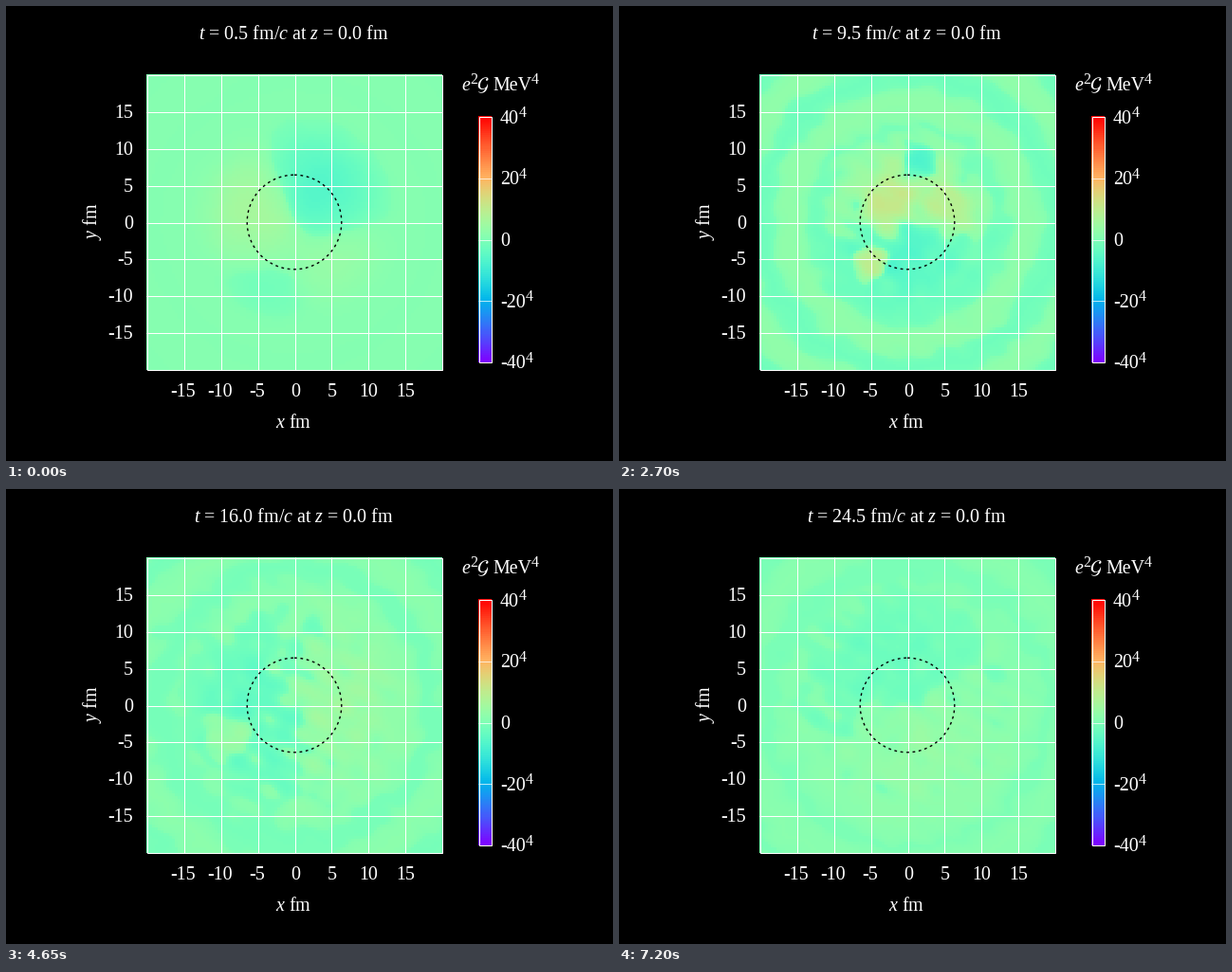
Recreate the animation shown at these times as a matplotlib script. Size 640 by 480 pixels, loop 7350 ms.

```python
import numpy as np
import matplotlib.pyplot as plt
from matplotlib.animation import FuncAnimation
from matplotlib.patches import Circle, Rectangle

plt.rcParams.update({
    "font.family": "Liberation Serif",
    "mathtext.fontset": "custom",
    "mathtext.rm": "Liberation Serif",
    "mathtext.it": "Liberation Serif:italic",
    "toolbar": "None",
})

DPI, FRAMES, STEP = 80, 49, 150
PX = 72 / DPI                     # points per pixel
CX, CY, SCALE = 304, 228, 7.775   # plot centre and pixels per fm
CELLS, LIMIT = 104, 40

# Key poses of the core dipole: direction of its negative side, radius, level.
TIMES = [.5, 4.5, 9.5, 12, 16, 18.5, 24.5]
TURN = [30, 95, 270, 235, 190, 150, 110]
REACH = [10, 16, 10, 11, 13, 13, 14]
LEVEL = [5.5, 6.5, 6.5, 5.5, 4.6, 4.4, 3.2]

# Short-lived hot spots: time, x, y, radius, level.
SPOTS = [
    (4.5, -3.5, 8.5, 4, 8.5), (4.5, 4.8, 2.5, 2, 13), (4.5, 2, 4, 3.5, -10),
    (4.5, -2, -3, 3.5, 10), (4.5, -1, -8.2, 1.2, -9),
    (9.5, -3, 2.5, 3.2, 9.5), (9.5, 5.5, 2, 2.8, 8), (9.5, 1.5, 8.3, 2.2, -8.5),
    (9.5, -5, -5.5, 2, 10),
    (12, 9, 1, 3, 6), (12, -2.5, -3, 2, 7),
    (17, -9, -4, 3, 6), (18.5, 2, 7, 4, -6.5),
]

axis = (np.arange(CELLS) + .5) * 40 / CELLS - 20
X, Y = np.meshgrid(axis, axis)

rng = np.random.default_rng(7)
WAVES = [(rng.uniform(.6, 2.6), rng.uniform(0, 2 * np.pi), rng.uniform(0, 2 * np.pi))
         for _ in range(30)]


def square(level):
    return level * abs(level)


def ripple(waves, t):
    """Smooth seeded noise that drifts slowly."""
    total = sum(np.sin(k * (.7 * X * np.cos(a) + Y * np.sin(a)) + p + .5 * t * np.cos(3 * p))
                for k, a, p in waves)
    return total / np.sqrt(len(waves))


def levels(t):
    """Colour levels: signed square roots, so that signs meet at sharp edges."""
    age = min(t / 12, 1)
    rough = .15 + .45 * age
    x, y = X + rough * ripple(WAVES[:8], t), Y + rough * ripple(WAVES[8:16], t)
    r, angle = np.hypot(x, y), np.arctan2(y, x)
    turn = np.radians(np.interp(t, TIMES, TURN))
    reach = np.interp(t, TIMES, REACH)
    power = square(np.interp(t, TIMES, LEVEL))

    # Core: a turning dipole, with a quadrupole that dies out early.
    core = np.exp(-(r / reach) ** 4)
    modes = -np.cos(angle - turn) * np.tanh(r / 2)
    modes -= np.exp((.5 - t) / 1.5) * r / 8 * np.cos(2 * (angle - np.radians(60)))
    field = 1 + power * core * (modes + .5 * age * ripple(WAVES[16:], t))

    # Rings that run outwards at the speed of light.
    swell = 5 * np.exp(-((t - 10) / 5) ** 2) + 1.5 * age
    field += swell * (1 - core) * np.cos(2 * np.pi * (r - t - 6.5) / 8)

    for birth, sx, sy, radius, level in SPOTS:
        life = np.exp(-((t - birth) / 1.8) ** 2)
        dist = np.hypot(x - sx, y - sy) / radius
        field += square(level) * life * np.exp(-dist ** 4)
    return np.sign(field) * np.sqrt(np.abs(field))


fig = plt.figure(figsize=(640 / DPI, 480 / DPI), dpi=DPI, facecolor="black")
ax = fig.add_axes([0, 0, 1, 1])
ax.axis("off")


def label(x, y, text, size=20, ha="left", **kw):
    return ax.text(x, y, text, color="white", fontsize=size * PX, ha=ha,
                   va=kw.pop("va", "baseline"), **kw)


def line(x, y, alpha=1):
    ax.plot(x, y, color="white", lw=PX, alpha=alpha, solid_capstyle="butt")


def frame(x, y, w, h):
    ax.add_patch(Rectangle((x, y), w, h, fill=False, ec="white", lw=PX, zorder=3))


def picture(data, extent, **kw):
    return ax.imshow(data, cmap="rainbow", vmin=-LIMIT, vmax=LIMIT, extent=extent,
                     interpolation="nearest", aspect="auto", **kw)


image = picture(np.zeros((CELLS, CELLS)), (148, 460, 384, 72), origin="lower")
picture(np.linspace(LIMIT, -LIMIT, 128)[:, None], (498, 512, 376, 116))

for v in range(-15, 16, 5):
    px, py = np.floor(CX + v * SCALE) + .5, np.floor(CY - v * SCALE) + .5
    line([px, px], [72, 384])
    line([148, 460], [py, py])
    label(px + (1 if v >= 0 else -1), 411.5, str(v), ha="center")
    label(134, py + 6.5, str(v), ha="right")

frame(148.5, 72.5, 311, 311)
frame(498.5, 116.5, 13, 259)
ax.add_patch(Circle((CX, CY), 49.8, fill=False, ec="black", lw=1.4 * PX,
                    ls=(0, (2, 2.6)), zorder=4))

for v in range(-LIMIT, LIMIT + 1, 20):
    y = 246 - v * 129.5 / LIMIT
    if abs(v) < LIMIT:
        line([498, 512], [np.floor(y) + .5] * 2, .7)
    label(521, y + 7, str(v))
    if v:
        label(541 if v > 0 else 548, y + .5, "4", 16)

label(480, 89, "$e$")
label(489, 81.5, "2", 16)
label(496.5, 89, r"$\mathcal{G}$", math_fontfamily="stix")
label(513.5, 89, "MeV")
label(554, 81.5, "4", 16)
label(303, 445, "$x$ fm", ha="center")
label(91, 227, "$y$ fm", ha="center", va="center", rotation=90)
title = label(303, 35, "", ha="center")

ax.set_xlim(0, 640)
ax.set_ylim(480, 0)


def update(i):
    t = .5 * (i + 1)
    image.set_data(levels(t))
    title.set_text(f"$t$ = {t:.1f} fm/$c$ at $z$ = 0.0 fm")
    return image, title


anim = FuncAnimation(fig, update, frames=FRAMES, interval=STEP, repeat=True,
                     repeat_delay=0, blit=False)
plt.show()
```
